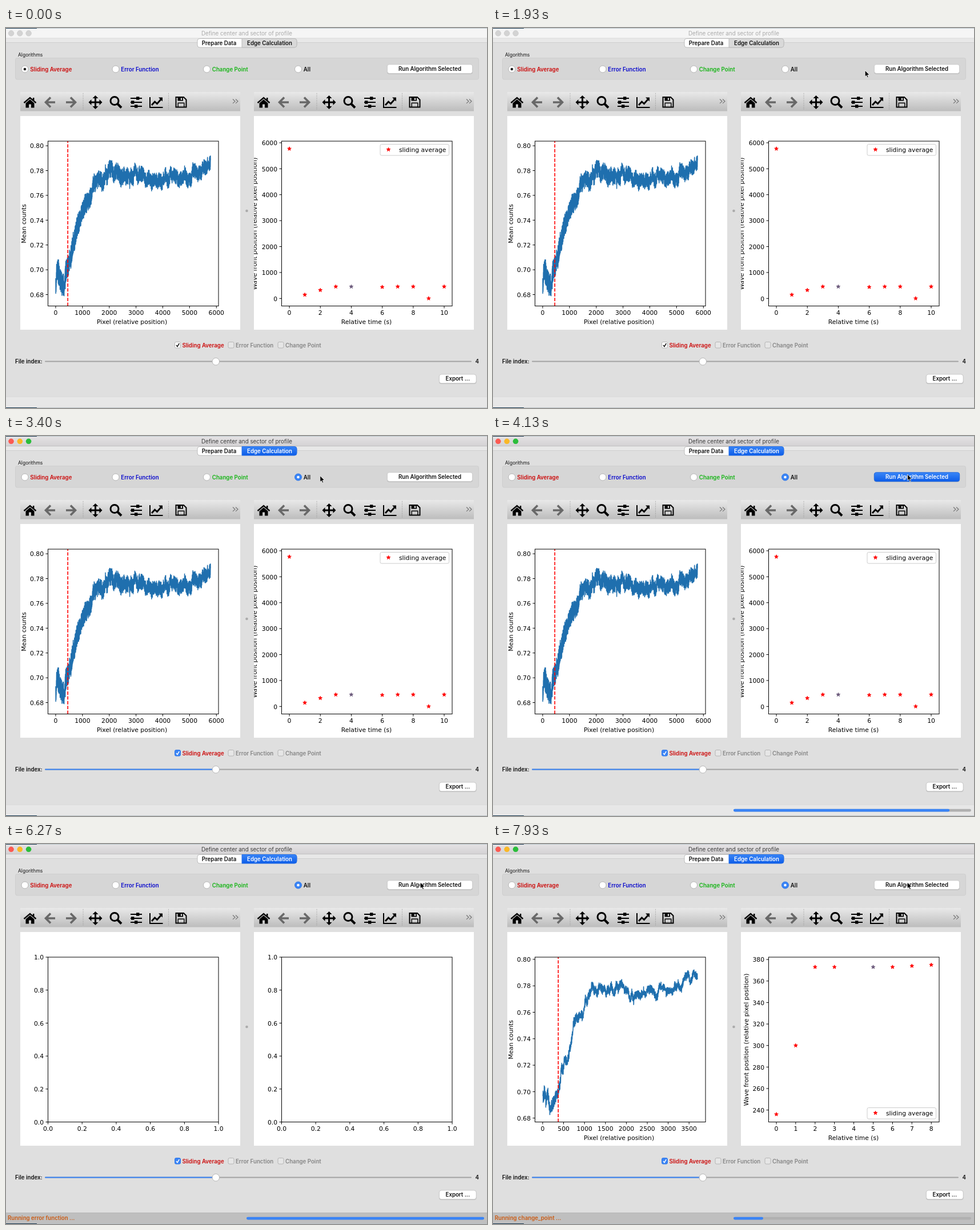
Animation, 842 px wide and 665 px high, one loop 8 s. Source, as an HTML page with a canvas:

```html
<!DOCTYPE html>
<html lang="en">
<head>
<meta charset="utf-8">
<title>Define center and sector of profile</title>
<style>
html, body { margin: 0; width: 100%; height: 100%; overflow: hidden; background: #dfdfdf; }
canvas { display: block; }
</style>
</head>
<body>
<canvas id="stage" width="842" height="665"></canvas>
<script>
const ctx = document.getElementById('stage').getContext('2d');
const LOOP = 8000, STEP = 1000 / 15;
const UI = 'Inter, sans-serif', PLOT = '"DejaVu Sans", sans-serif';
const RED = '#cc0a0a', GREY = '#858585', BLUE = '#3a84f5', INK = '#111';
const LEFT = 25, RIGHT = 434, PANEL = 385;

// ---------- drawing helpers ----------
function text(s, x, y, { color = INK, size = 9.7, weight = 560, font = UI, align = 'left' } = {}) {
  ctx.font = `${weight} ${size}px ${font}`;
  ctx.textAlign = align;
  ctx.fillStyle = color;
  ctx.fillText(s, x, y + size * 0.365);
}
const plotText = (s, x, y, align = 'center') =>
  text(s, x, y, { font: PLOT, size: 10.75, weight: 400, align, color: '#000' });

function rect(x, y, w, h, fill) {
  ctx.fillStyle = fill;
  ctx.fillRect(x, y, w, h);
}
function paint(path, fill, stroke, width = 1) {
  if (fill) { ctx.fillStyle = fill; ctx.fill(path); }
  if (stroke) { ctx.strokeStyle = stroke; ctx.lineWidth = width; ctx.stroke(path); }
}
const svg = (d, ...style) => paint(new Path2D(d), ...style);
const line = (x0, y0, x1, y1, color, width) => svg(`M${x0} ${y0}L${x1} ${y1}`, null, color, width);
function box(x, y, w, h, r, ...style) {
  const path = new Path2D();
  path.roundRect(x, y, w, h, r);
  paint(path, ...style);
}
function disc(x, y, r, ...style) {
  const path = new Path2D();
  path.arc(x, y, r, 0, 7);
  paint(path, ...style);
}
function star(x, y, color) {
  const path = new Path2D();
  for (let i = 0; i < 10; i++) {
    const a = i * Math.PI / 5, d = i % 2 ? 1.4 : 3.5;
    path.lineTo(x + d * Math.sin(a), y - d * Math.cos(a));
  }
  path.closePath();
  paint(path, color, color, 0.9);
}
function placed(x, y, angle, drawing) {
  ctx.save();
  ctx.translate(x, y);
  ctx.rotate(angle);
  drawing();
  ctx.restore();
}
function vertical(y0, y1, top, bottom) {
  const g = ctx.createLinearGradient(0, y0, 0, y1);
  g.addColorStop(0, top);
  g.addColorStop(1, bottom);
  return g;
}
const blueFill = (y0, y1) => vertical(y0, y1, '#3a86f7', '#0c5ce8');
const mix = (a, b, f) => a + (b - a) * f;
const smooth = f => f * f * (3 - 2 * f);

// ---------- plot data ----------
// Noise around a midline: slow drift towards random goals plus fast jitter.
function makeTrace(midline, { perPixel, spread, jitter, seed }) {
  const random = () => (seed = (seed * 16807) % 2147483647) / 2147483647 * 2 - 1;
  const path = new Path2D(), hold = perPixel * 3;
  let from = 0, goal = 0, k = 0;
  const [x0] = midline[0], [x1] = midline.at(-1);
  for (let i = 0; i <= (x1 - x0) * perPixel; i++) {
    const x = x0 + i / perPixel;
    if (i % hold === 0) [from, goal] = [goal, random()];
    if (x > midline[k + 1][0]) k++;
    const [ax, ay] = midline[k], [bx, by] = midline[k + 1];
    const drift = mix(from, goal, i % hold / hold);
    const size = spread * (0.62 + 0.5 * Math.exp((x0 - x) / 70));
    path.lineTo(x, mix(ay, by, (x - ax) / (bx - ax)) + size * mix(drift, random(), jitter));
  }
  return path;
}
const longTrace = makeTrace(
  [[87, 443], [107, 434], [116, 395], [132, 320], [160, 270], [180, 254], [250, 263], [320, 262], [358, 232]],
  { perPixel: 7, spread: 36, jitter: 0.58, seed: 41 });
const shortTrace = makeTrace(
  [[87, 448], [107, 445], [120, 405], [144, 314], [172, 257], [221, 249], [236, 268], [320, 252], [358, 223]],
  { perPixel: 5, spread: 27, jitter: 0.42, seed: 77 });

// Linear scale with its tick labels: value `start` sits at `pos`, every `inc` is `gap` pixels on.
const scale = (start, inc, count, digits, pos, gap) => ({
  at: v => pos + (v - start) / inc * gap,
  ticks: Array.from({ length: count }, (_, i) => [(start + inc * i).toFixed(digits), pos + gap * i])
});
const firstResult = {
  trace: longTrace, edge: 108.2, labelX: 439, legendY: 203, current: 4,
  leftX: scale(0, 1000, 7, 0, 87, 46.87), leftY: scale(0.68, 0.02, 7, 2, 466.5, -43.4),
  rightX: scale(0, 2, 6, 0, 496, 54.2), rightY: scale(0, 1000, 7, 0, 473.3, -45.4),
  fronts: [5770, 140, 320, 455, 455, null, 440, 455, 455, 0, 455]
};
const secondResult = {
  trace: shortTrace, edge: 114.2, labelX: 447, legendY: 461, current: 5,
  leftX: scale(0, 500, 8, 0, 87, 36.6), leftY: scale(0.68, 0.02, 7, 2, 479.7, -46.3),
  rightX: scale(0, 1, 9, 0, 496, 33.9), rightY: scale(240, 20, 8, 0, 465.6, -37.64),
  fronts: [236, 300, 373, 373, null, 373, 373, 374, 375]
};
const unitX = x => scale(0, 0.2, 6, 1, x, 59.7), unitY = scale(0, 0.2, 6, 1, 486.5, -57.7);

// ---------- plots ----------
function axes(x, xScale, yScale) {
  ctx.strokeStyle = '#000';
  ctx.lineWidth = 1;
  ctx.strokeRect(x + 0.5, 198, 298.5, 288.5);
  for (const [s, p] of xScale.ticks) {
    line(p, 486.5, p, 490.5, '#000');
    plotText(s, p, 498);
  }
  for (const [s, p] of yScale.ticks) {
    line(x - 3.5, p, x + 0.5, p, '#000');
    plotText(s, x - 7, p + 0.3, 'right');
  }
}
const sideLabel = (s, x) => placed(x, 342.5, -Math.PI / 2, () => plotText(s, 0, -3.9));

function plots(result) {
  for (const x of [LEFT, RIGHT]) {
    rect(x, 154, PANEL, 374, '#fff');
    if (!result) axes(x + 48, unitX(x + 48.5), unitY);
  }
  if (!result) return;

  ctx.lineJoin = 'round';
  paint(result.trace, null, '#1f6fae', 1.5);
  ctx.lineJoin = 'miter';
  ctx.setLineDash([5.9, 2.5]);
  line(result.edge, 486.5, result.edge, 198, '#f00', 1.6);
  ctx.setLineDash([]);
  axes(LEFT + 48, result.leftX, result.leftY);
  plotText('Pixel (relative position)', 220.5, 514);
  sideLabel('Mean counts', 35);

  ctx.save();
  ctx.beginPath();
  ctx.rect(RIGHT, 154, PANEL, 374);
  ctx.clip();
  axes(RIGHT + 48, result.rightX, result.rightY);
  plotText('Relative time (s)', 631, 514);
  sideLabel('Wave front position (relative pixel position)', result.labelX);
  result.fronts.forEach((v, i) => {
    if (v !== null) star(result.rightX.at(i), result.rightY.at(v), i === result.current ? '#6a587a' : '#f00');
  });
  const y = result.legendY;
  box(655, y + 0.5, 120.5, 19.5, 2.5, '#fff', '#ccc');
  star(669.5, y + 9.7, '#f00');
  plotText('sliding average', 688, y + 9.8, 'left');
  ctx.restore();
}

// ---------- toolbar: every icon is drawn around its own centre ----------
function arrow(dir) {
  ctx.scale(dir, 1);
  svg('M-8 0H8M0-8.5L8.5 0L0 8.5', null, '#686868', 3.6);
}
function pan() {
  svg('M-9 0H9M0-9V9', null, '#000', 3);
  for (let i = 0; i < 4; i++) placed(0, 0, i * Math.PI / 2, () => svg('M0-12L5-7H-5Z', '#000'));
}
function sliders() {
  [-7, 0, 7].forEach((y, i) => {
    line(-10, y, 10, y, '#000', 2);
    rect([2, -7, -1][i] - 2, y - 2.7, 5.4, 5.4, '#000');
  });
}
const icons = {
  17: () => {
    svg('M-10.5 1L0-8L10.5 1', null, '#000', 2.4);
    svg('M-7.5 1.5L0-5L7.5 1.5V9.5H2V3.5H-2V9.5H-7.5ZM5-8H7.4V-3H5Z', '#000');
  },
  53: () => arrow(-1),
  88: () => arrow(1),
  131.5: pan,
  167: () => {
    disc(-2, -2.5, 7, null, '#000', 3);
    line(3, 2.5, 10, 9.5, '#000', 4);
  },
  203: sliders,
  238.5: () => {
    svg('M-11.5-9V9H11', null, '#000', 2);
    svg('M-8.5 5L-3-1L1 2.5L8.5-6', null, '#000', 2.8);
    svg('M3.5-8.5H10.5V-1.5Z', '#000');
  },
  281.5: () => {
    svg('M-9-9H4.5L9-4.5V8.5H-9Z', null, '#000', 2);
    svg('M-6-9H3.5V-2.5H-6Z', '#000');
    rect(-0.7, -7.7, 2.4, 3.7, '#d2d2d2');
    svg('M-5.3 8V1.2H5.3V8', null, '#000', 1.4);
  }
};
function toolbar(x) {
  rect(x, 112, PANEL, 33.5, vertical(112, 145, '#e9e9e9', '#bdbdbd'));
  for (const [dx, icon] of Object.entries(icons)) placed(x + Number(dx), 130, 0, icon);
  ctx.setLineDash([1, 2]);
  for (const dx of [110, 259.5]) line(x + dx, 114, x + dx, 144, '#8c8c8c');
  ctx.setLineDash([]);
  placed(x + 372, 128.2, 0, () => svg('M0-3.7L4 0L0 3.7M5-3.7L9 0L5 3.7', null, '#777', 1.2));
}

// ---------- controls ----------
function radio(x, label, color, on, active) {
  const lit = on && active;
  disc(x, 72, 6, lit ? BLUE : '#fff', lit ? '#2b74e8' : '#b2b2b2', 0.9);
  if (on) disc(x, 72, 2.3, lit ? '#fff' : '#222');
  text(label, x + 9.3, 72, { color });
}
function checkbox(x, label, color, on, active) {
  const lit = on && active;
  box(x + 0.5, 549.5, 10, 10.5, 2.3, lit ? BLUE : on ? '#fff' : '#e6e6e6', lit ? '#2f78e8' : '#b4b4b4');
  if (on) svg(`M${x + 3} 555l2 2.5l3.3-5.7`, null, lit ? '#fff' : INK, 1.5);
  text(label, x + 13.5, 555, { color });
}
function button(x, y, w, label, pressed) {
  box(x, y + 0.7, w, 16, 4, '#b3b3b3');
  box(x + 0.3, y, w - 0.6, 15.8, 4, pressed ? blueFill(y, y + 16) : '#fff', pressed ? '#2268dd' : '#c9c9c9');
  text(label, x + w / 2, y + 7.8, { align: 'center', color: pressed ? '#fff' : INK });
}
function titleAndTabs(active) {
  rect(0, 0, 842, 18, active ? vertical(0, 18, '#e5e3e5', '#d3d1d3') : '#f5f5f5');
  rect(0, 0, 842, 1, '#bdc8cd');
  rect(0, 0, 54, 1, '#16364d');
  rect(0, 17.5, 842, 0.8, active ? '#b5b5b5' : '#d3d3d3');
  rect(0, 18.3, 842, 7, '#e8e8e8');
  rect(0, 25, 842, 1, '#cecece');
  ['#fb5a52', '#f9b827', '#2bbd3b'].forEach((c, i) =>
    disc(9 + 15.3 * i, 9.3, 4.8, active ? c : '#d3d3d3', active ? null : '#c4c4c4', 0.6));
  text('Define center and sector of profile', 421.5, 9.5,
    { weight: 420, size: 9.8, align: 'center', color: active ? '#3d3d3d' : '#ababab' });

  box(335, 18.5, 174, 15.5, 4, '#fff', '#bcbcbc');
  box(413, 18.5, 96, 15.5, [0, 4, 4, 0], active ? blueFill(18, 34) : '#d9d9d9', active ? '#2670e8' : '#bcbcbc');
  text('Prepare Data', 373, 26, { align: 'center' });
  text('Edge Calculation', 461.5, 26, { align: 'center', color: active ? '#fff' : INK });
}
function statusBar(task, progress) {
  rect(0, 645, 842, 19, task ? '#bfbfbf' : '#e7e7e7');
  rect(0, 645, 842, 0.8, task ? '#b4b4b4' : '#d8d8d8');
  rect(0, 664, 842, 1, '#bcc3c7');
  rect(0, 664, 54, 1, '#16364d');
  if (task) text(`Running ${task} ...`, 3, 654.8, { color: '#cb5a12' });
  if (progress) {
    box(421, 652.8, 416, 4.6, 2.3, '#b0b0b0');
    box(421, 652.8, 416 * progress, 4.6, 2.3, BLUE);
  }
}

// ---------- timeline ----------
const pointerKeys = [
  [333, 555, 244], [867, 118, 84], [1133, 178, 69], [1733, 709, 86], [2000, 640, 72],
  [2533, 500, 73], [2800, 517, 70], [3267, 517, 70], [3800, 725, 67], [LOOP, 725, 67]
];
function pointer(t) {
  const i = pointerKeys.findIndex(key => key[0] > t);
  if (i < 1) return;
  const [t0, x0, y0] = pointerKeys[i - 1], [t1, x1, y1] = pointerKeys[i];
  const f = smooth((t - t0) / (t1 - t0));
  placed(mix(x0, x1, f), mix(y0, y1, f), 0, () =>
    svg('M.4 0V11L2.9 8.8L4.6 12.6L6.4 11.8L4.8 8.1L8.2 7.9Z', '#000', '#fff', 0.8));
}
const taskAt = t =>
  t < 4200 ? '' : t < 6260 ? 'sliding average' : t < 6860 ? 'error function' : 'change_point';

function progressAt(t) {
  if (t < 4060) return 0;
  if (t < 4530) return 10 / 11;
  if (t >= 7930) return 1 / 8;
  const files = 1 + Math.floor((t - 4466) / (4 * STEP));
  return files > 6 ? 1 : files / 8;
}

function draw(t) {
  const active = t >= 2999, all = t >= 3066;

  rect(0, 0, 842, 665, '#dfdfdf');
  titleAndTabs(active);

  text('Algorithms', 21, 46.5, { size: 8.5, weight: 420 });
  box(16.5, 52.5, 811, 37.5, 3, '#d6d6d6', '#cecece');
  radio(33, 'Sliding Average', RED, !all, active);
  radio(192, 'Error Function', '#0a0acc', false, active);
  radio(351.5, 'Change Point', '#14b414', false, active);
  radio(511.5, 'All', INK, all, active);
  button(667, 63.8, 150, 'Run Algorithm Selected', t >= 4060 && t < 4530);

  toolbar(LEFT);
  toolbar(RIGHT);
  plots(t < 4199 ? firstResult : t < 6460 ? null : secondResult);
  disc(421.5, 320, 2.3, '#ababab');

  checkbox(295, 'Sliding Average', RED, true, active);
  checkbox(388.5, 'Error Function', GREY, false, active);
  checkbox(475.5, 'Change Point', GREY, false, active);

  text('File index:', 16, 583.5);
  box(68, 582.4, 747, 2.2, 1.1, '#a3a3a3');
  if (active) box(68, 582.4, 299, 2.2, 1.1, BLUE);
  disc(367.3, 583.7, 6.3, '#fff', '#b0b0b0', 0.9);
  text('4', 821.5, 583.5);
  button(758, 606, 65.5, 'Export ...', false);

  statusBar(taskAt(t), progressAt(t));
  pointer(t);
}

function frame(now) {
  draw(Math.floor((now % LOOP + 4) / STEP) * STEP % LOOP);
  requestAnimationFrame(frame);
}
requestAnimationFrame(frame);
</script>
</body>
</html>
```
